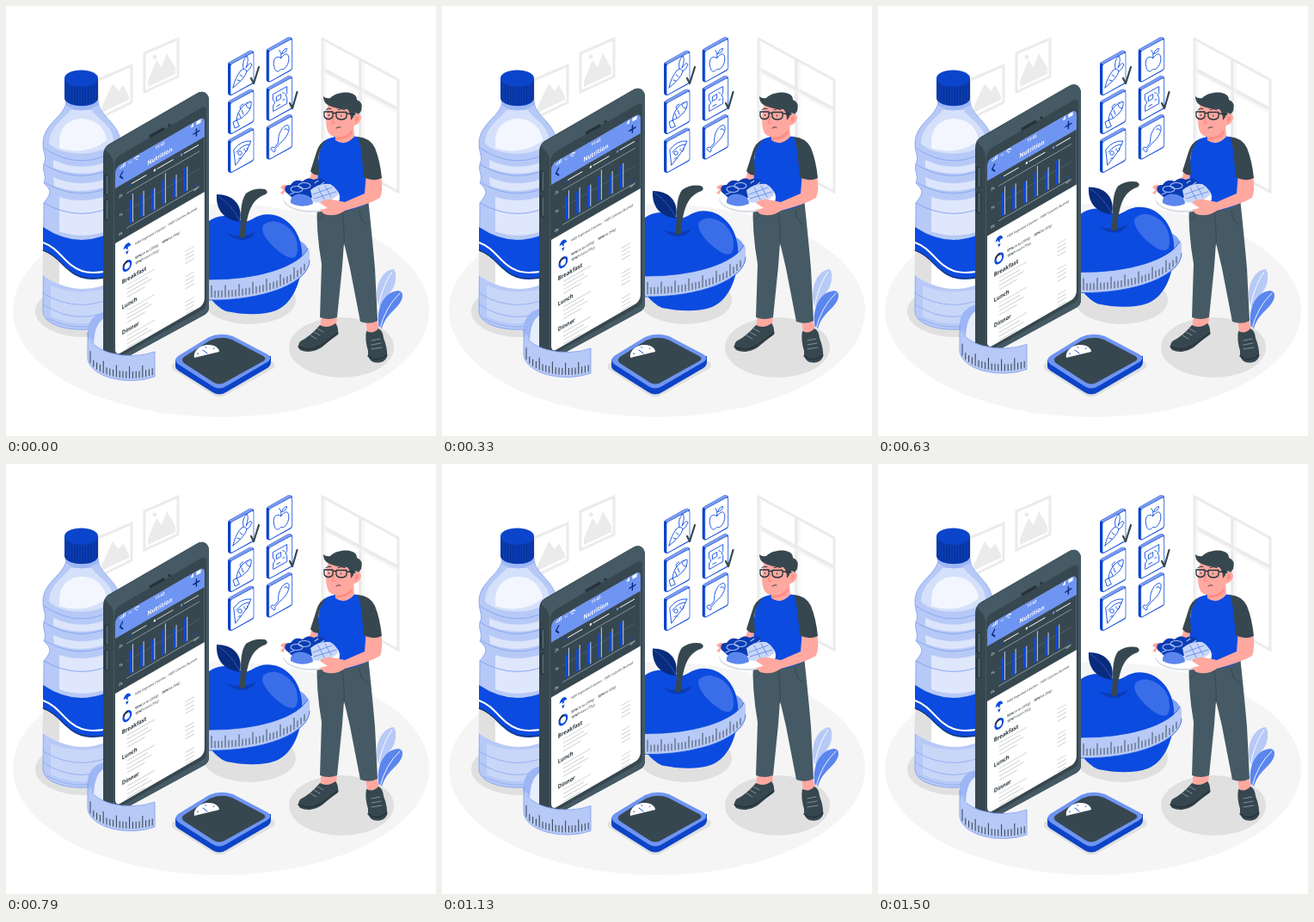
Animation, 500 px wide and 500 px high, one loop 1.54 s. Source, as an HTML page:

```html
<!DOCTYPE html>
<html lang="en">
<head>
<meta charset="utf-8">
<style>
html, body { margin: 0; width: 100%; height: 100%; overflow: hidden; background: #fff; }
svg { display: block; width: 100%; height: 100%; }
text { font-family: "Noto Sans", "Open Sans", sans-serif; }
.line { fill: none; stroke-linecap: round; stroke-linejoin: round; }
</style>
</head>
<body>
<svg viewBox="0 0 500 500">
<ellipse cx="250" cy="354" rx="242" ry="124" fill="#f5f5f5"/>

<g id="wall" fill="#fff" stroke="#ebebeb" stroke-width="3">
  <path d="M107 86L146 69V112L107 131Z"/>
  <path d="M161 55L200 38V82L161 100Z"/>
  <path stroke="none" fill="#ebebeb" d="M111 118L124 90 131 99 136 92 143 105V109L111 124ZM165 87L175 63 181 71 187 55 197 72V79L165 94Z"/>
  <circle cx="173" cy="59" r="2.5" stroke="none" fill="#ebebeb"/>
  <path d="M368 38L456 86V216L368 169Z"/>
  <path d="M412 62V193M368 73L456 120" stroke-width="4"/>
  <path d="M371 43V168M416 66V194M370 77L456 124" stroke="#f5f5f5" stroke-width="1.5"/>
</g>

<g id="cards"></g>
<path class="line" d="M285 84L288 90 294 71M330 113L333 119 338.500 100" stroke="#37474f" stroke-width="2.200"/>

<g id="bottle">
  <ellipse cx="90" cy="355" rx="56" ry="30" fill="#e0e0e0"/>
  <path fill="#b7c9f6" stroke="#7d9df0" stroke-width=".8" d="M70 110C70 128 43 136 43 160C43 171 48 176 44 184C42 193 48 197 44 206C53 214 53 218 44 229L43 356C46 383 130 383 133 356V229C124 218 124 212 132 204C129 196 134 193 132 184C128 176 133 171 133 160C133 136 107 128 107 110Z"/>
  <path fill="#d5e0fa" d="M50 160C50 140 68 131 75 121H100C106 132 125 138 125 158C110 176 66 176 50 160Z"/>
  <path fill="#f3f6fe" d="M62 158C62 144 70 132 87 131C104 131 115 141 117 156C104 168 80 172 62 165Z"/>
  <path fill="#dce5fb" d="M55 179Q88 195 125 178V187Q88 202 55 188ZM55 199Q88 214 124 198V207Q88 222 56 209Z"/>
  <path fill="#dfe7fc" d="M62 222Q88 231 120 220V261Q88 272 62 262Z"/>
  <path class="line" stroke="#8aa7f2" stroke-width="1" d="M44 165Q88 195 132 165M44 184Q88 211 132 184M46 206Q88 230 130 206M44 229Q88 254 132 229"/>
  <path fill="#0c4be0" d="M43 257Q88 287 133 257V310Q88 344 43 311Z"/>
  <path fill="#fff" d="M43 285C62 292 68 309 87 316Q102 321 133 313V315Q88 344 43 313Z"/>
  <path fill="#e0e0e0" d="M43 285Q54 289 62 298V323Q51 319 43 313Z"/>
  <path class="line" stroke="#fff" stroke-width="2" d="M43 275C63 282 68 301 88 308Q102 313 133 305"/>
  <path class="line" stroke="#263238" stroke-width="1" d="M43 284C62 291 68 308 87 315Q102 320 133 312"/>
  <path fill="#c8d6f8" d="M52 325Q85 339 125 326V360Q88 378 52 361Z"/>
  <path class="line" stroke="#8aa7f2" stroke-width=".8" d="M43 334Q88 361 133 334M43 347Q88 376 133 347M48 363Q88 384 130 362"/>
  <path fill="#9db6f4" d="M69 107Q88 122 107 107V115Q88 128 69 115Z"/>
  <path fill="#0a3cb4" d="M68 84V108C72 119 104 119 107 108V84Z"/>
  <ellipse cx="87.500" cy="84" rx="19.500" ry="9.500" fill="#0b45cc"/>
  <path id="ridges" class="line" stroke="#08318f" stroke-width="1"/>
</g>

<ellipse cx="283" cy="342" rx="54" ry="28" fill="#e0e0e0"/>

<g id="float">
  <g id="apple">
    <path fill="#83a3f2" d="M334 270Q350 275 351 284V304H335Z"/>
    <path fill="#0c4be0" d="M274 250C262 241 238 240 226 262C216 300 229 343 256 355C276 359 298 360 314 354C334 346 346 318 344 284C340 248 308 233 286 248Q279 252 274 250Z"/>
    <path fill="#3a6de8" d="M299 255C311 244 333 255 338 273C341 290 337 296 326 291C311 283 294 264 299 255Z"/>
    <path fill="#0a3cb4" d="M257 264Q266 273 276 272Q286 271 291 262Q283 267 274 267Q265 268 257 264Z"/>
    <path fill="#37474f" d="M271 269C275 252 270 231 279 218Q289 211 301 213Q306 216 302 219C287 224 280 237 278 268Q275 271 271 269Z"/>
    <path fill="#082b7d" d="M272 251C251 248 244 235 245 219C263 219 276 230 272 251Z"/>
    <path class="line" stroke="#4069c7" stroke-width=".7" d="M272 250Q263 232 247 221"/>
    <path fill="#b7c9f6" d="M236 318A113 44 0 0 0 351 282Q353 283 353 287V296A113 46 0 0 1 236 342Z"/>
    <path class="line" stroke="#0c4be0" stroke-width=".7" d="M236 318A113 44 0 0 0 351 282M353 296A113 46 0 0 1 236 342"/>
    <path id="appleTicks" stroke="#263238" stroke-width=".8"/>
  </g>

  <path fill="#e6edfd" stroke="#7d9df0" stroke-width=".7" d="M95 382Q95 360 115 356H122V408Q98 400 95 382Z"/>
  <path fill="#9db6f4" d="M95 382Q95 360 115 356V363Q103 368 102 393Z"/>

  <g id="phone">
    <path fill="#37474f" d="M113 174Q113 165 119 161L221 102Q227 98 232 101Q236 104 236 110V350Q236 356 231 359L132 413Q121 413 113 406Z"/>
    <path fill="#455a64" d="M116 164L222 102Q227 98 232 101Q236 104 236 110V350Q236 356 231 359L132 413Q125 413 125 406V183Q124 174 116 168Z"/>
    <path fill="#37474f" d="M126 185Q126 177 133 173L226 119Q233 115 233 122V345Q233 350 229 353L132 408Q126 410 126 404Z"/>
    <path class="line" stroke="#263238" stroke-width="5" d="M117 198V218M117 227V247"/>
    <path class="line" stroke="#455a64" stroke-width="3" d="M117.500 198V218M117.500 227V247"/>
    <path class="line" stroke="#263238" stroke-width="3.200" d="M168 151.500L183 143M190 138.500h.1"/>
    <clipPath id="glass"><rect width="120" height="219" rx="7"/></clipPath>
    <g transform="matrix(.866 -.5 0 1 127 188)">
      <g id="screen" clip-path="url(#glass)">
        <rect width="120" height="220" fill="#fff"/>
        <rect width="120" height="88" fill="#37474f"/>
        <rect width="120" height="24" fill="#6f95f2"/>
        <path class="line" stroke="#082b7d" stroke-width="1.700" d="M10 9.500L6.500 13.500 10 17.500M105 13.500h8M109 9.500v8"/>
        <path stroke="#fff" stroke-width="1.100" d="M7 5V3M9 5V2M11 5V1M13 5V0"/>
        <path class="line" stroke="#fff" d="M26 3q3-3 6 0M28 5q1-1 2 0"/>
        <path fill="#fff" d="M101 4l4-4v5ZM109 1h6v4h-6Z"/>
        <g fill="#fff">
          <text x="60" y="6" font-size="5" font-weight="600" text-anchor="middle">11:43</text>
          <text x="18" y="5" font-size="3.500">4G</text>
          <text x="60" y="19" font-size="7.200" font-weight="600" text-anchor="middle">Nutrition</text>
          <text x="5" y="38" font-size="4.500">2k</text>
          <text x="5" y="60" font-size="4.500">1k</text>
          <text x="5" y="82" font-size="4.500">0k</text>
          <text x="105" y="80" font-size="3.500">6pm</text>
        </g>
        <path stroke="#fff" stroke-width=".9" d="M22 29.500h20M56 29.500h22M92 29.500h20"/>
        <circle cx="53" cy="29.500" r="1.400" fill="#fff"/>
        <circle cx="19" cy="29.500" r="1.400" fill="#0c4be0"/>
        <circle cx="89" cy="29.500" r="1.400" fill="#6f95f2"/>
        <path stroke="#90a4ae" stroke-width=".8" d="M15 37.500h98M15 78h98"/>
        <path stroke="#546e7a" stroke-width=".6" d="M15 58h98"/>
        <g id="bars"></g>
        <path fill="#0c4be0" d="M11 101q1-5 5-5t5 5q-2-1-4 0v2h-2v-2q-2-1-4 0ZM14 105h4l-2 4Z"/>
        <circle cx="16" cy="122" r="5" fill="none" stroke="#0c4be0" stroke-width="2.600"/>
        <path fill="none" stroke="#263238" stroke-width="2.600" d="M11.200 120.500A5 5 0 0 1 17 117.100"/>
        <g fill="#263238" font-size="3.900">
          <text x="26" y="103.500">1600 Ingested Calories - 1400 Calories Burned</text>
          <text x="27" y="120"><tspan font-weight="700">55%</tspan>Carbs (200g)</text>
          <text x="63" y="120"><tspan font-weight="700">30%</tspan>Fat (50g)</text>
          <text x="27" y="126.500"><tspan font-weight="700">15%</tspan>Protein (35g)</text>
        </g>
      </g>
    </g>
  </g>

  <g id="tape">
    <path fill="#b7c9f6" stroke="#7d9df0" stroke-width=".8" d="M95 380A50 27 0 0 0 173 402V431A50 27 0 0 1 95 409Z"/>
    <path id="tapeTicks" stroke="#263238" stroke-width=".9"/>
  </g>
</g>

<g id="scale">
  <path fill="#e0e0e0" d="M194 416Q190 420 196 424L240 452Q248 457 256 452L310 422Q316 417 309 413L260 386Z"/>
  <path fill="#0c43c7" d="M197 411V419Q197 422 202 425L240 449Q248 454 256 449L304 421Q308 418 308 414V407Z"/>
  <path fill="#6f95f2" d="M200 407L236 385Q249 379 264 384L304 405Q311 409 304 414L256 442Q248 447 240 442L201 417Q194 412 200 407Z"/>
  <path fill="#37474f" d="M207 408L237 389Q250 383 263 388L299 407Q304 410 299 413L254 438Q248 441 242 438L208 416Q202 412 207 408Z"/>
  <path fill="#fff" d="M219 409C217 399 230 391 242 395Q248 398 248 402Z"/>
  <path class="line" stroke="#0c4be0" stroke-width="1" d="M229 400L234 404M222.500 404l1 .5M232 396.500l.4.800M242 398l-.8.600"/>
</g>

<g id="plant">
  <path fill="#b7c9f6" d="M433 350C427 326 437 308 450 306Q454 307 453 318C452 332 440 338 436 349Z"/>
  <path fill="#5b86ee" d="M434 375C429 350 441 332 456 331Q462 332 461 338C459 351 443 355 437 375Z"/>
  <path class="line" stroke="#fff" stroke-width=".9" d="M433 350Q438 324 449 309M435 375Q441 350 458 334"/>
</g>

<ellipse cx="390" cy="397" rx="61" ry="35" fill="#e0e0e0"/>
<g id="man">
  <path fill="#ffa8a0" d="M367 358L365 376Q374 382 384 374L385 358ZM418 362L420 380Q427 384 434 378L431 362Z"/>
  <path fill="#37474f" d="M365 371Q374 376 383 369Q387 373 386 382Q376 389 367 397Q354 405 342 400Q338 396 342 390Q354 384 365 371ZM419 378Q427 382 433 375Q438 377 439 386Q444 399 443 408Q439 417 427 414Q420 411 421 401Q417 388 419 378Z"/>
  <path class="line" stroke="#263238" stroke-width="1.500" d="M340 396Q353 403 367 394L386 380M421 407Q431 415 443 406"/>
  <path class="line" stroke="#90a4ae" stroke-width=".8" d="M354 383l7 4M358 379l7 4M362 375l7 4M425 389l10-2M425 394l11-2M425 399l12-2"/>
  <path fill="#455a64" d="M362 228Q360 260 367 300L365 362Q375 366 385 362L391 303 393 275 400 305 412 367Q423 371 432 366L429 305Q425 260 421 224Z"/>
  <path class="line" stroke="#37474f" stroke-width="1" d="M391 240Q394 262 393 278M411 237Q411 250 420 254M369 243Q366 249 363 248"/>
  <path fill="#ffa8a0" d="M356 188L354 199 333 209Q322 206 319 211L323 214 319 217Q323 221 330 219L360 209 366 190Z"/>
  <path fill="#0c4be0" d="M373 155Q386 149 409 152Q419 158 418 180L422 229Q390 246 362 233L363 180Q364 163 373 155Z"/>
  <path fill="#37474f" d="M373 155Q364 159 361 170L354 192Q359 198 364 196L363 178Q364 166 373 155Z"/>
  <path fill="#ffa8a0" d="M383 143V156Q394 164 405 152L404 138Z"/>
  <path fill="#ff8d86" d="M384 152Q396 151 402 144L403 148Q396 156 384 156Z"/>
  <path fill="#ffa8a0" d="M375 113C371 126 371 143 376 149Q383 155 394 151Q402 147 405 139Q412 137 413 130Q411 123 405 126L402 113Z"/>
  <path fill="#37474f" d="M369 105Q372 108 377 107C383 100 398 99 403 102Q408 104 408 109Q416 112 413 122L410 126Q405 122 404 129L401 133Q401 124 397 120Q383 120 374 115Q369 112 369 105Z"/>
  <path fill="#ff8d86" d="M406 129q4-2 4 2q0 3-4 4Z"/>
  <g class="line" stroke="#263238">
    <path stroke-width="1.300" d="M370 123h10v5q-1 3.500-5 3.500t-5-3.500ZM384 123.500h12v5q-1 3.500-6 3.500t-6-3.500ZM380 125q2-1 4 0M396 125L406 126"/>
    <path stroke-width="1" d="M372 120.500q3-2 6-1M386 120.500q4-2 8 0M375.500 126.500v1M389.500 127v1"/>
    <path stroke-width=".9" d="M384 142q2-2 5-1"/>
  </g>
  <path class="line" stroke="#ff7d77" stroke-width="1" d="M382 128L379 136h4"/>

  <ellipse cx="355" cy="224" rx="33" ry="16" fill="#d7dce5"/>
  <ellipse cx="355" cy="221.500" rx="33" ry="16.500" fill="#fff"/>
  <path fill="#0a3cb4" d="M325 216Q322 208 331 208Q336 200 345 204Q351 198 358 202Q368 198 372 205Q378 210 368 216L352 225 334 224Z"/>
  <path fill="#5b86ee" d="M331 225Q335 217 346 219Q358 222 357 230Q344 236 331 229Z"/>
  <path fill="#c8d6f8" d="M354 214Q365 205 377 207Q387 213 386 220Q373 231 357 228Z"/>
  <path class="line" stroke="#5b86ee" stroke-width=".8" d="M357 219l22-8M358 224l26-8M363 211l7 14M371 209l7 13"/>
  <g class="line" stroke="#a9c0f5" stroke-width="1.100">
    <ellipse cx="338" cy="213" rx="7" ry="3.500"/><ellipse cx="347" cy="209" rx="7" ry="3.500"/>
    <path d="M359 206l4-3M366 208l4-3M330 219l5-2"/>
  </g>
  <path fill="#ffa8a0" d="M419 193L436 197Q439 213 435 223Q421 231 394 238Q383 246 370 242L365 237 374 235 365 229Q370 224 379 225L394 228 417 218Z"/>
  <path fill="#37474f" d="M409 152Q423 153 429 165Q435 180 437 200Q426 205 416 199L414 178Q413 163 409 152Z"/>
</g>
</svg>
<script>
const $ = id => document.getElementById(id);
const add = (id, markup) => $(id).insertAdjacentHTML('beforeend', markup);
const range = (n, fn) => Array.from({ length: n }, (_, i) => fn(i)).join('');

// Food cards: line icons on isometric tiles
const icons = [
  'M6 44Q8 33 15 24Q20 20 22 25Q20 33 6 44ZM18 22Q16 13 22 7Q25 11 21 21Q26 13 28 17Q26 23 22 25M11 35l3 1M14 29l3 2',
  'M17 25C11 21 7 27 9 35C11 43 14 41 17 38C22 40 27 31 26 24C25 18 21 20 17 25ZM17 25Q18 19 15 16M18 20Q20 14 24 14Q23 19 18 20',
  'M10 37Q11 27 17 21Q21 16 27 15Q28 23 22 29Q17 35 10 37ZM10 37L6 39 8 46 13 44ZM15 24Q12 20 18 18M21 18q0 5 5 5M16 25l2 5M13 29l2 5M23 17v.5',
  'M8 22L24 13V20Q21 24 24 26V33L8 42V35Q12 31 8 29ZM12 25l5-3v5l-5 3ZM12 36l4-2M19 20l2 1M19 29l2-1',
  'M7 26Q15 15 27 16L22 27 9 44ZM10 29Q17 20 25 20M12 31a2 2 0 1 0 4-2a2 2 0 1 0-4 2M19 25a2 2 0 1 0 3-1M12 37a2 2 0 0 1 3-1',
  'M14 33C13 23 19 13 25 13C29 17 24 28 16 34L10 41Q11 45 8 44Q7 43 7 42Q4 42 6 39Q8 38 9 39ZM21 18q3-2 4 1'
];
icons.forEach((icon, i) => {
  const x = 258 + i % 2 * 44.7, y = 51 - i % 2 * 15.5 + (i >> 1) * 45;
  add('cards', `<g transform="translate(${x} ${y})">
    <path fill="#0c43c7" d="M0 17Q0 15 2 14L25 1Q28 0 30 2V37Q30 39 28 40L4 53Q0 53 0 50Z"/>
    <path fill="#7d9df0" d="M1 15L25 1Q28 0 30 2L4 17Z"/>
    <path fill="#fff" stroke="#0c4be0" stroke-width=".7" d="M3 19Q3 17 5 16L28 3.500Q30 3 30 5V36Q30 38 28 39L5 52Q3 53 3 51Z"/>
    <path class="line" stroke="#0c4be0" stroke-width=".9" d="${icon}"/></g>`);
});

// Bottle cap ridges
$('ridges').setAttribute('d', range(12, i => {
  const x = 70 + i * 3.2, dip = 9 * Math.sqrt(1 - ((x - 87.5) / 19.5) ** 2);
  return `M${x} ${86 + dip}V${106 + dip}`;
}));

// Tape marks stand on the lower edge, an elliptic arc
const ticks = (id, x0, n, step, cx, cy, rx, ry) => $(id).setAttribute('d', range(n, i => {
  const x = x0 + i * step, y = cy + ry * Math.sqrt(1 - ((x - cx) / rx) ** 2);
  return `M${x} ${y - 3}v${i % 4 ? -8 : -14}`;
}));
ticks('tapeTicks', 98, 20, 3.8, 145, 409, 50, 27);
ticks('appleTicks', 239, 28, 4, 240, 296, 113, 46);

// Chart bars
[27, 26, 25, 29, 23, 28].forEach((h, i) => {
  const x = 19 + i * 14.6;
  add('bars', `<path fill="#0c4be0" d="M${x} ${75 - h}h3v${h}h-3Z"/>
    <path fill="#a9c0f5" d="M${x + 4} ${69 - h + i % 3 * 3}h1.300V75h-1.300Z"/>`);
});
add('bars', '<path fill="#0c4be0" d="M107 72h2v3h-2Z"/>');

// Meal lists
['Breakfast', 'Lunch', 'Dinner'].forEach((meal, i) => {
  const y = 140 + i * 29.5;
  add('screen', `<text x="9" y="${y}" font-size="6.800" font-weight="600" fill="#263238">${meal}</text>
    <path stroke="#d5d5d5" stroke-width="1.200" d="${range(4, k => {
      const v = y + 4.5 + k * 4.6;
      return `M16 ${v}h${[37, 28, 33, 24][k]}M94 ${v}h12`;
    })}"/>`);
});

const LOOP = 1540, LIFT = 4.5;
function draw() {
  const phase = (performance.now() + 25) % LOOP / LOOP;
  const y = LIFT * (Math.cos(phase * 2 * Math.PI) - 1);
  $('float').setAttribute('transform', `translate(0 ${y})`);
  requestAnimationFrame(draw);
}
draw();
</script>
</body>
</html>
```
